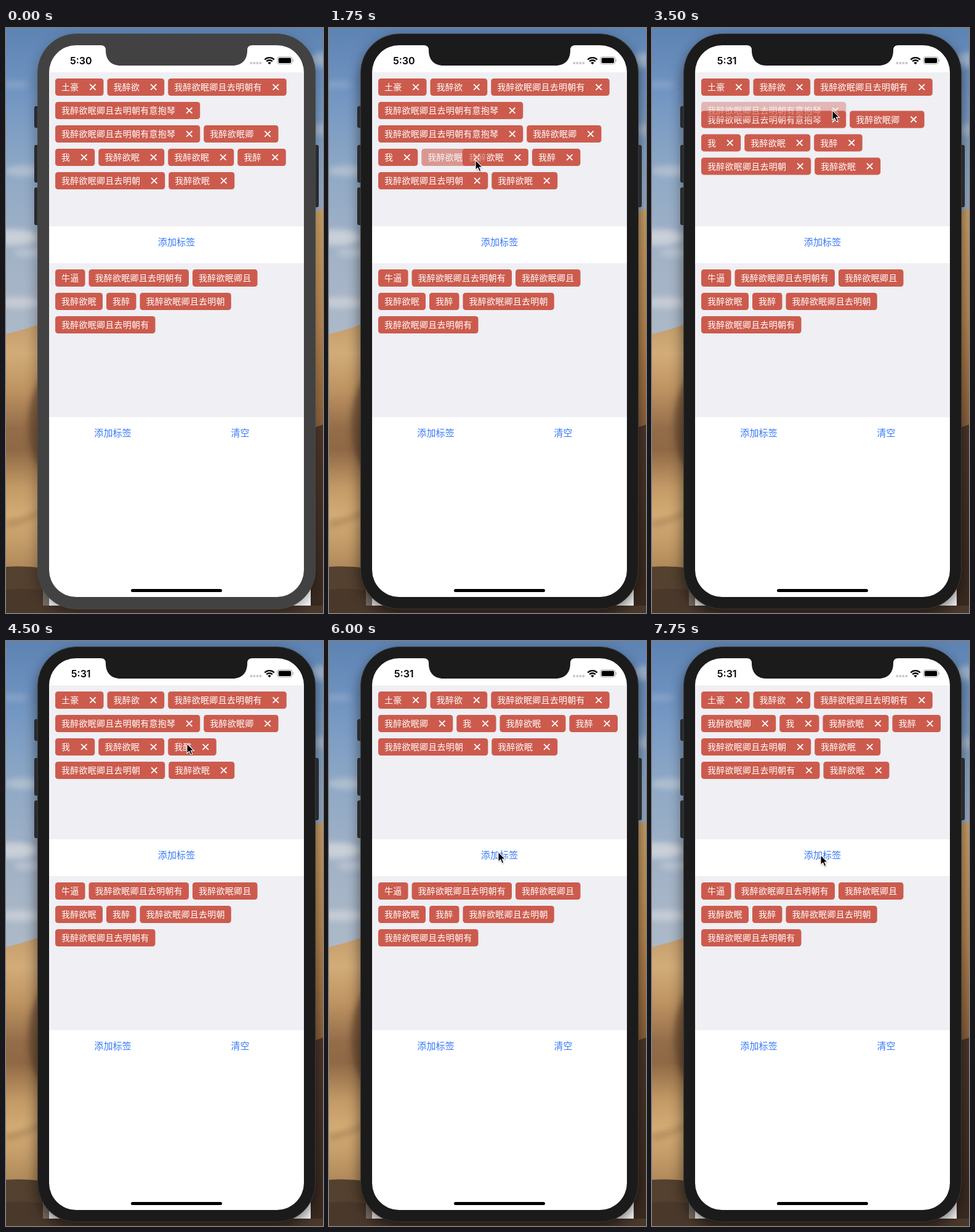
An HTML page for the animation above (8 s loop, 515 by 950 pixels).

```html
<!DOCTYPE html>
<html lang="zh-CN">
<head>
<meta charset="utf-8">
<title>Tags</title>
<style>
html, body { margin: 0; width: 515px; height: 950px; overflow: hidden; }
svg { display: block; }
text { font-family: "Noto Sans CJK SC", "Noto Sans CJK", sans-serif; }
.tag text { font-size: 14px; letter-spacing: .25px; fill: #fff; }
.link { font-size: 15px; letter-spacing: .2px; fill: #3478f6; text-anchor: middle; }
#clock { font: 600 16px Inter, sans-serif; text-anchor: middle; }
</style>
</head>
<body>
<svg id="stage" width="515" height="950" viewBox="0 0 515 950">
  <defs>
    <linearGradient id="sky" x2="0" y2="1">
      <stop offset="0" stop-color="#5d83b3"/><stop offset=".2" stop-color="#7195c2"/>
      <stop offset=".45" stop-color="#8fa9c6"/><stop offset=".7" stop-color="#a2b2c6"/>
      <stop offset="1" stop-color="#aebac8"/>
    </linearGradient>
    <linearGradient id="dune" x2="0" y2="1">
      <stop offset="0" stop-color="#c49d6c"/><stop offset=".12" stop-color="#d2ac78"/>
      <stop offset=".27" stop-color="#bd9261"/><stop offset=".42" stop-color="#936c49"/>
      <stop offset=".5" stop-color="#8f6845"/><stop offset=".65" stop-color="#c39a66"/>
      <stop offset=".76" stop-color="#d3ab74"/><stop offset=".86" stop-color="#c59d69"/>
      <stop offset="1" stop-color="#a98356"/>
    </linearGradient>
    <linearGradient id="slope" x2="0" y2="1">
      <stop offset="0" stop-color="#cda167"/><stop offset=".5" stop-color="#b98851"/>
      <stop offset="1" stop-color="#8a5f3a"/>
    </linearGradient>
    <linearGradient id="shade" x2="0" y2="1">
      <stop offset="0" stop-color="#4d372a"/><stop offset="1" stop-color="#38291f"/>
    </linearGradient>
    <filter id="soft" x="-50%" y="-50%" width="200%" height="200%"><feGaussianBlur stdDeviation="5"/></filter>
    <filter id="blur" x="-20%" y="-20%" width="140%" height="140%"><feGaussianBlur stdDeviation="11"/></filter>
    <filter id="drop" x="-50%" y="-50%" width="200%" height="200%"><feGaussianBlur stdDeviation="1"/></filter>
  </defs>

  <rect width="515" height="520" fill="url(#sky)"/>
  <g filter="url(#soft)" fill="#c9cfd8">
    <ellipse cx="14" cy="92" rx="24" ry="6" opacity=".25"/>
    <ellipse cx="30" cy="232" rx="32" ry="9" opacity=".55"/>
    <ellipse cx="10" cy="340" rx="42" ry="13"/>
    <ellipse cx="38" cy="365" rx="26" ry="7" opacity=".6"/>
    <ellipse cx="20" cy="446" rx="40" ry="9" opacity=".9"/>
    <ellipse cx="512" cy="52" rx="18" ry="12" opacity=".5"/>
    <ellipse cx="512" cy="165" rx="14" ry="10" opacity=".5"/>
  </g>
  <path d="M0 497Q30 490 60 479V890H0Z" fill="url(#dune)"/>
  <g filter="url(#soft)">
    <path d="M62 560Q34 600 36 650T62 720Z" fill="#60432f" opacity=".6"/>
    <path d="M0 800Q26 796 60 780V790Q26 808 0 812Z" fill="#9d784e" opacity=".5"/>
  </g>
  <path d="M495 301L515 293V660H495Z" fill="url(#slope)"/>
  <path d="M495 651L515 644V950H495Z" fill="url(#shade)"/>
  <path d="M0 875Q30 873 60 877V938H515V950H0Z" fill="#54412f"/>
  <path d="M0 912Q40 908 70 916V938H515V950H0Z" fill="#46362a" opacity=".7"/>

  <rect id="shadow" x="51" y="18" width="452" height="935" rx="66" filter="url(#blur)"/>
  <g fill="#292c2f" stroke="#1c1e20">
    <rect x="46.5" y="127.500" width="8" height="34" rx="2"/>
    <rect x="46.5" y="190.500" width="8" height="60" rx="2"/>
    <rect x="46.5" y="259.500" width="8" height="60" rx="2"/>
    <rect x="499.500" y="190.500" width="8" height="100" rx="2"/>
  </g>
  <rect id="frame" x="51.500" y="9.500" width="451" height="934" rx="63"/>
  <clipPath id="clip"><rect x="70" y="28" width="414" height="896" rx="44"/></clipPath>
  <g clip-path="url(#clip)">
    <rect x="70" y="28" width="414" height="896" fill="#fff"/>
    <path d="M70 72H484V322H70ZM70 382H484V632H70Z" fill="#efeff4"/>
  </g>
  <path id="notch" d="M154 27V28Q162 28 162 36C162 52 171 61 186 61H368C383 61 392 52 392 36Q392 28 400 28V27Z"/>

  <text id="clock" x="121.700" y="58.700"></text>
  <g fill="#c6c6c9">
    <circle cx="398.300" cy="57" r="2"/><circle cx="403.300" cy="57" r="2"/>
    <circle cx="408.300" cy="57" r="2"/><circle cx="413.300" cy="57" r="2"/>
  </g>
  <g fill="none" stroke="#000" stroke-width="2.400">
    <path d="M420.300 51.300A11 11 0 0 1 435.700 51.300"/>
    <path d="M423.200 54.200A6.800 6.800 0 0 1 432.800 54.200"/>
  </g>
  <path d="M428 59.200L425.300 56.500A3.900 3.900 0 0 1 430.700 56.500Z"/>
  <rect x="440.900" y="46.900" width="24" height="11.600" rx="3.200" fill="none" stroke="#a3a3a3"/>
  <rect x="442.700" y="48.500" width="20.400" height="8.400" rx="1.600"/>
  <path d="M466 51Q467.600 52.600 466 54.600Z" fill="#a3a3a3" stroke="#a3a3a3" stroke-width=".6"/>

  <g id="lower"></g>
  <g id="upper"></g>
  <text id="add" class="link" x="277.100" y="352.700">添加标签</text>
  <text class="link" x="173.600" y="662.700">添加标签</text>
  <text class="link" x="380.600" y="662.700">清空</text>
  <rect x="203" y="911" width="148" height="5" rx="2.500"/>

  <g id="cursor">
    <path d="M0 1.500V17.500L3.700 14L6.300 20L9.200 18.800L6.600 13H12Z" opacity=".35" filter="url(#drop)"/>
    <path d="M0 0V16L3.700 12.600L6.200 18.400L8.900 17.300L6.400 11.600H11.400Z" stroke="#fff" stroke-width="1.100"/>
  </g>
</svg>
<script>
const LOOP = 8000, STEP = 250;
const LINE = "我醉欲眠卿且去明朝有意抱琴";
const $ = id => document.getElementById(id);
const verse = n => typeof n === "number" ? LINE.slice(0, n) : n;

const topTags = ["土豪", 3, 10, 13, 13, 5, 1, 4, 4, 2, 9, 4, 10, 4].map(verse);
const lowTags = ["牛逼", 10, 6, 4, 2, 9, 10].map(verse);
const removals = [[7, 1627], [3, 3314], [4, 5125]];   // tag, start time
const additions = [[12, 7000], [13, 7750]];
const FADE = 300;
const path = [                                        // time, x, y
  [250, 445, 251], [750, 330, 230], [1250, 238, 214.500], [2500, 238, 214.500],
  [3250, 293, 133.500], [3750, 293, 133.500], [4500, 294, 166.500], [5000, 293, 134],
  [5500, 293, 136], [5750, 283, 258], [6000, 275, 342.500], [6250, 274, 347.500]
];

const tagWidth = (s, pad) => s.length * 14.25 + pad;

// Left-to-right flow that wraps at the right inset
function flow(tags, ids, pad, top) {
  const spots = {};
  let x = 80, y = top;
  for (const i of ids) {
    const w = tagWidth(tags[i], pad);
    if (x > 80 && x + w > 474) { x = 80; y += 38; }
    spots[i] = { x, y };
    x += w + 6;
  }
  return spots;
}

function makeTag(s, pad, closable) {
  const w = tagWidth(s, pad), c = w - 17.5;
  const cross = closable
    ? `<path d="M${c - 4.7} 9.300l9.400 9.400m0-9.400l-9.400 9.400" stroke="#fff" stroke-width="1.800"/>` : "";
  return `<g class="tag"><rect width="${w}" height="28" rx="4.500" fill="#cc5b4d"/>
    <text x="10" y="19.200">${s}</text>${cross}</g>`;
}

const place = (el, p) => el.setAttribute("transform", `translate(${p.x} ${p.y})`);
const mix = (a, b, k) => a + (b - a) * k;

$("upper").innerHTML = topTags.map(s => makeTag(s, 50, true)).join("");
$("lower").innerHTML = lowTags.map(s => makeTag(s, 20, false)).join("");
const upper = [...$("upper").children];
const lowSpots = flow(lowTags, lowTags.keys(), 20, 392);
[...$("lower").children].forEach((el, i) => place(el, lowSpots[i]));

function drawTags(t) {
  let ids = [...topTags.keys()].filter(i => additions.every(([n, at]) => n !== i || t >= at));
  let going = -1, k = 0, next = null;
  for (const [n, at] of removals) {
    if (t >= at + FADE) ids = ids.filter(i => i !== n);
    else if (t > at) { going = n; k = (t - at) / FADE; }
  }
  const spots = flow(topTags, ids, 50, 82);
  if (going >= 0) next = flow(topTags, ids.filter(i => i !== going), 50, 82);
  upper.forEach((el, i) => {
    const a = spots[i];
    el.style.display = a ? "" : "none";
    if (!a) return;
    const b = next && next[i] || a;
    place(el, { x: mix(a.x, b.x, k), y: mix(a.y, b.y, k) });
    el.style.opacity = i === going ? 1 - k : 1;
  });
  const last = going < 0 ? upper[upper.length - 1] : upper[going];
  if ($("upper").lastChild !== last) $("upper").appendChild(last);
}

function drawCursor(t) {
  $("cursor").style.display = t < path[0][0] ? "none" : "";
  const j = path.findIndex(p => p[0] > t);
  const b = path[j < 0 ? path.length - 1 : j];
  const a = j < 0 ? b : path[Math.max(0, j - 1)];
  const k = a === b ? 0 : (t - a[0]) / (b[0] - a[0]);
  place($("cursor"), { x: mix(a[1], b[1], k), y: mix(a[2], b[2], k) });
}

function draw(t) {
  const active = t >= 1500;
  const body = active ? "#1b1b1b" : "#424242";
  $("frame").setAttribute("fill", body);
  $("frame").setAttribute("stroke", active ? "#3b3835" : "#484848");
  $("notch").setAttribute("fill", body);
  $("shadow").style.opacity = active ? .55 : .35;
  $("clock").textContent = t < 3000 ? "5:30" : "5:31";
  $("add").style.opacity = t === 6750 || t === 7500 ? .3 : 1;
  drawTags(t);
  drawCursor(t);
}

let start = null;
function tick(now) {
  if (start === null) start = now;
  draw(Math.floor((now - start) % LOOP / STEP) * STEP);
  requestAnimationFrame(tick);
}
draw(0);
requestAnimationFrame(tick);
</script>
</body>
</html>
```
